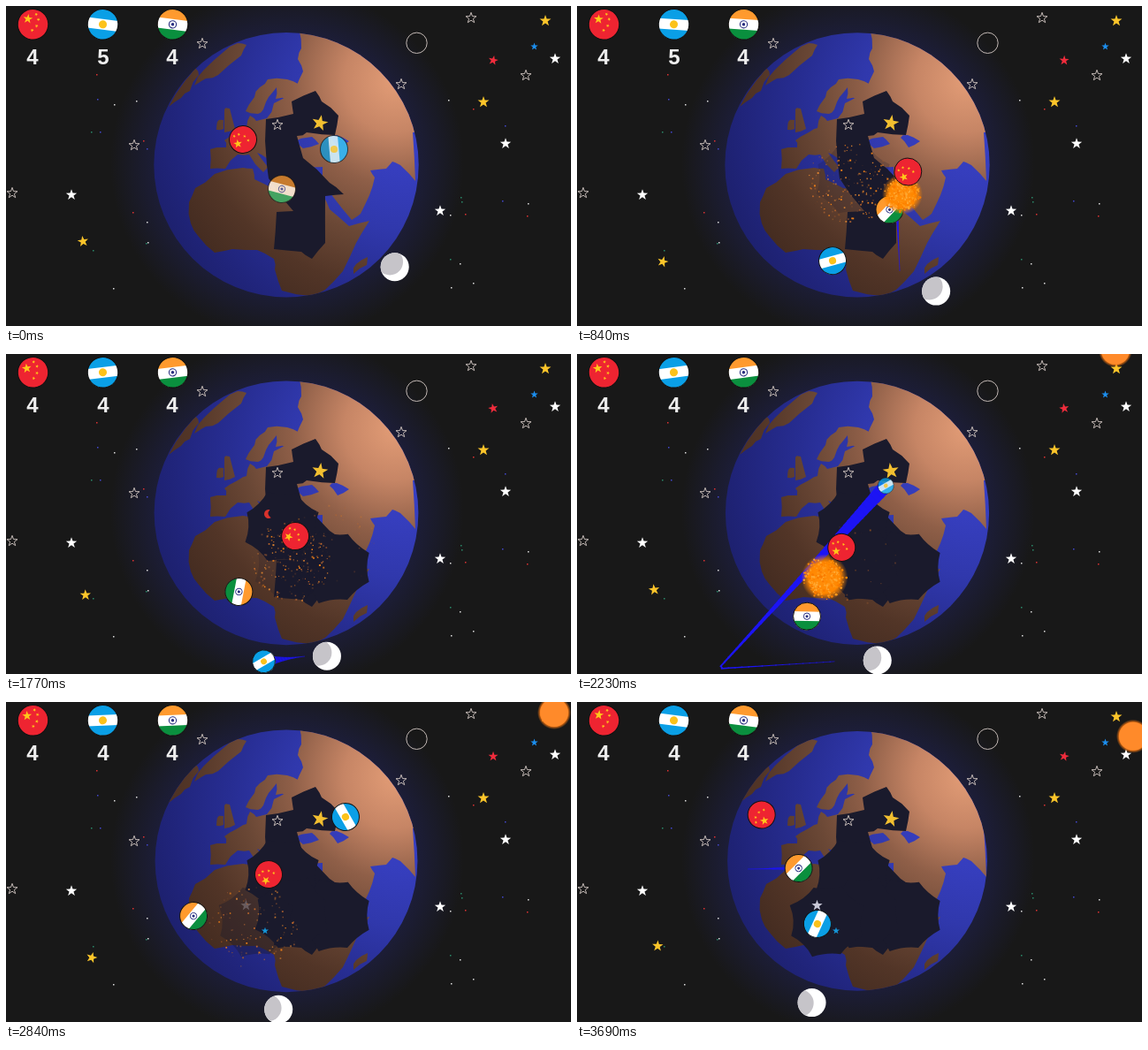
An HTML page with a canvas for the animation above (3760 ms loop, 639 px wide and 362 px high).

```html
<!DOCTYPE html>
<html lang="en">
<head>
<meta charset="utf-8">
<title>Planet battle</title>
<style>
  html, body { margin: 0; width: 100%; height: 100%; overflow: hidden; background: #181818; }
  canvas { position: absolute; left: 0; top: 0; }
  span {
    position: absolute; top: 46px; width: 40px; text-align: center;
    font: bold 24px/24px "Liberation Sans", Arial, sans-serif; color: #eee;
  }
</style>
</head>
<body>
<canvas id="stage" width="639" height="362"></canvas>
<span style="left:10px">4</span>
<span style="left:90px" id="score">5</span>
<span style="left:168px">4</span>
<script>
const ctx = document.getElementById('stage').getContext('2d');
const score = document.getElementById('score');
const LOOP = 3760, STEP = LOOP / 49, TAU = Math.PI * 2;
const clamp = v => Math.max(0, Math.min(1, v));
const wave = (t, period, peak = 0) => Math.cos((t - peak) / period * TAU);

function seeded(seed) {
  return () => (seed = (seed * 16807) % 2147483647) / 2147483647;
}

function pairs(text, draw) {
  const n = text.split(' ').map(Number);
  for (let i = 0; i < n.length; i += 2) draw(n[i], n[i + 1]);
}

// A closed outline; every side gets a small random kink
function coast(text) {
  const rnd = seeded(text.length), points = [], path = new Path2D();
  pairs(text, (x, y) => points.push([x, y]));
  points.forEach(([x, y], i) => {
    const [nx, ny] = points[(i + 1) % points.length];
    path.lineTo(x, y);
    path.lineTo((x + nx) / 2 + 3 * rnd() - 1.5, (y + ny) / 2 + 3 * rnd() - 1.5);
  });
  path.closePath();
  return path;
}

const greenland = '184 114 203 84 214 70 218 78 208 96 198 104';
const arctic = '213 90 224 72 246 52 262 42 272 44 266 56 240 78 226 82';
const britain = '247 117 253 116 259 139 247 143';
const ireland = '239 131 246 129 246 139 238 140';
const nordic = '271 119 281 103 287 92 296 83 318 83 334 90 318 105 305 105 306 92 297 103 291 117 285 122';
const eurasia = '231 162 249 160 247 152 262 143 272 138 276 124 283 130 295 127 303 110 318 102 328 92 '
  + '336 74 330 60 334 48 331 25 400 20 480 70 480 143 460 143 463 198 446 180 437 176 430 184 412 186 '
  + '417 194 411 214 401 235 391 242 370 216 358 196 358 182 334 183 318 172 306 175 308 187 296 173 '
  + '284 166 296 182 291 188 275 168 262 168 248 184 231 184';
const africa = '236 190 268 183 279 184 281 196 301 206 330 208 358 213 366 230 388 249 411 243 396 268 '
  + '381 300 361 321 345 328 312 322 304 298 303 286 284 276 256 275 236 279 218 261 209 246 207 222 214 206';
const madagascar = '393 303 396 292 409 284 408 293';
const land = [greenland, arctic, britain, ireland, nordic, eurasia, africa, madagascar].map(coast);
const lakes = ['325 154 346 148 354 156 336 161', '366 149 374 146 388 153 375 160'].map(coast);
const scar = coast('294 128 325 122 323 108 350 96 357 108 376 124 372 146 340 143 329 147 336 172 '
  + '366 200 382 213 361 215 361 268 346 286 334 278 303 275 306 233 325 232 297 195 295 180');

// Waypoints: time, x, y, angle
const ships = {
  india: [[0, 312, 207, 15], [500, 365, 300, -10], [780, 362, 232, -40], [840, 354, 230, -45], [1300, 299, 263, -180],
    [1770, 263, 269, -260], [2230, 260, 297, -360], [2840, 212, 242, -410], [3400, 193, 189, -408], [3690, 252, 188, -405]],
  argentina: [[0, 371, 162, -95], [840, 289, 288, -15], [1300, 293, 305, -60], [1610, 338, 342, -40],
    [1770, 290, 348, -30], [1900, 160, 356, -30], [2230, 352, 146, -30], [2840, 384, 130, -120], [3690, 271, 252, -65]],
  china: [[0, 268, 151, -80], [840, 374, 188, -92], [1060, 389, 165, -70], [1300, 337, 212, -25],
    [1770, 327, 206, -45], [2230, 299, 219, -75], [2840, 297, 195, -105], [3690, 208, 127, -155]],
};
const sunPath = [[1600, 594, -24], [2230, 609, -4], [2840, 620, 12], [3690, 629, 39]];

// Boosts: ship, from, to, width
const boosts = [['india', 500, 900, 4], ['china', 1060, 1380, 5], ['argentina', 1610, 2380, 15], ['india', 3400, LOOP, 5]];

// Blasts, each leaving a burnt hole nearby
const blasts = [
  { start: 230, x: 307, y: 200, size: 19, hole: [312, 196] },
  { start: 690, x: 368, y: 213, size: 20, hole: [371, 241] },
  { start: 1150, x: 324, y: 233, size: 17, hole: [324, 240] },
  { start: 2080, x: 280, y: 253, size: 23, hole: [283, 248] },
];
for (const b of blasts) {
  const rnd = seeded(b.start), [x, y] = b.hole, n = 8;
  b.path = new Path2D();
  for (let i = 0; i <= n; i++) {
    const a = i / n * TAU + .4, mid = a - TAU / n / 2, r = i % n ? 40 + 6 * rnd() : 43;
    b.path.quadraticCurveTo(x + 35 * Math.cos(mid), y + 35 * Math.sin(mid), x + r * Math.cos(a), y + r * Math.sin(a));
  }
}

function at(keys, t) {
  const i = Math.max(0, keys.findLastIndex(k => k[0] <= t));
  const a = keys[i], b = keys[i + 1] || a;
  const u = clamp((t - a[0]) / (b[0] - a[0] || 1));
  return a.slice(1).map((v, n) => v + (b[n + 1] - v) * u);
}

function disc(x, y, r, fill) {
  ctx.beginPath();
  ctx.arc(x, y, r, 0, TAU);
  ctx.fillStyle = fill;
  ctx.fill();
}

function ring(x, y, r, color, width = 1) {
  ctx.beginPath();
  ctx.arc(x, y, r, 0, TAU);
  ctx.strokeStyle = color;
  ctx.lineWidth = width;
  ctx.stroke();
}

function star(x, y, r, color, turn = 0, hollow = false) {
  ctx.beginPath();
  for (let i = 0; i < 10; i++) {
    const a = turn + i * TAU / 10 - TAU / 4, d = i % 2 ? r * .4 : r;
    ctx.lineTo(x + d * Math.cos(a), y + r * .1 + d * Math.sin(a));
  }
  ctx.closePath();
  ctx.fillStyle = ctx.strokeStyle = color;
  ctx.lineWidth = 1;
  hollow ? ctx.stroke() : ctx.fill();
}

function radial(x, y, r, ...colors) {
  const g = ctx.createRadialGradient(x, y, 0, x, y, r);
  colors.forEach((c, i) => g.addColorStop(i / (colors.length - 1), c));
  return g;
}

const glow = radial(318, 178, 200, '#20244c', '#20244c', '#1f2246', '#1c1d36', '#181818');
const water = radial(450, 120, 330, '#3840c8', '#363ebe', '#3038ac', '#272d92', '#20247a', '#1a1d62');
const soil = radial(440, 85, 290, '#e29c76', '#c68565', '#8f5f48', '#6b4836', '#523527', '#432b20');

function stripes(outer, inner, edge) {
  [[outer, -20], [inner, -5.5], [edge, 5.5]].forEach(([c, y]) => {
    ctx.fillStyle = c;
    ctx.fillRect(-20, y, 40, 40);
  });
}
const flags = {
  china() {
    ctx.fillStyle = '#ee2431';
    ctx.fillRect(-20, -20, 40, 40);
    star(-6, -5.5, 5.2, '#ffc61a');
    pairs('2 -11 5 -6 4 1 0 6', (x, y) => star(x, y, 1.9, '#ffc61a', .4));
  },
  argentina() {
    stripes('#0a9fe6', '#fff', '#0a9fe6');
    disc(0, 0, 4.2, '#fcc21b');
  },
  india() {
    stripes('#ff9a2e', '#fff', '#0a8f3e');
    ring(0, 0, 3.8, '#2a3080');
    disc(0, 0, 1.6, '#2a3080');
  },
};

function badge(name, x, y, angle, r, alpha = 1) {
  ctx.save();
  ctx.globalAlpha = alpha;
  ctx.translate(x, y);
  ctx.rotate(angle * TAU / 360);
  ctx.scale(r / 16, r / 16);
  ctx.save();
  ctx.beginPath();
  ctx.arc(0, 0, 16, 0, TAU);
  ctx.clip();
  flags[name]();
  ctx.restore();
  ring(0, 0, 16, '#111');
  ctx.restore();
}

// Faint distant stars in the bands beside the globe
function drawDust() {
  const rnd = seeded(77), colors = ['#ddd', '#d33', '#2a8a6a', '#4348d0', '#ddd'];
  for (let i = 0; i < 28; i++) {
    ctx.fillStyle = colors[i % 5];
    const x = i % 2 ? 160 - 140 * rnd() ** 2 : 500 + 90 * rnd();
    ctx.fillRect(Math.round(x), Math.round(75 + 245 * rnd()), 1.5, 1.5);
  }
}

function drawSky(t) {
  ctx.fillStyle = '#181818';
  ctx.fillRect(0, 0, 639, 362);
  disc(318, 178, 200, glow);
  drawDust();
  pairs('621 59 565 155 74 213 491 231', (x, y) => star(x, y, 6.5, '#fff'));
  pairs('610 16 540 108', (x, y) => star(x, y, 6.8, '#fcc52a'));
  const s = wave(t, 2000, 1100);
  star(92.8 + 6 * s, 279 + 14 * s, 6.5, '#fcc52a', .25 * s + .1);
  star(551, 61, 5.8, '#f02c3c', .2 * wave(t, LOOP));
  star(597.5, 45.5, 4.4, '#1c8ff0');
}

function drawGlobe(t) {
  ctx.save();
  ctx.beginPath();
  ctx.arc(317, 179.8, 149.7 - 3 * (t / LOOP) ** 3, 0, TAU);
  ctx.clip();
  const paint = (color, paths) => {
    ctx.fillStyle = color;
    paths.forEach(p => ctx.fill(p));
  };
  ctx.fillStyle = water;
  ctx.fillRect(160, 20, 320, 320);
  paint(soil, land);
  paint(water, lakes);
  paint('#1a1a2c', [scar]);
  for (const b of blasts) {
    ctx.globalAlpha = clamp((t - b.start - 100) / 900) ** 3;
    paint('#1a1a2c', [b.path]);
  }
  ctx.restore();
}

function drawMarks(t) {
  const line = '#c2b8b4';
  pairs('222 42 526 13 588 78 447 88 145 157 7 211 307 134', (x, y) => star(x, y, 6.3, line, 0, true));
  ring(464.5, 41.8, 11.7, line);
  star(355, 131.5, 9.5, '#f2bf30', .2 * wave(t, 940));
  ctx.globalAlpha = .85 * clamp((t - 2600) / 800);
  star(271.5, 229.5, 6.5, '#e6e6f4');
  ctx.globalAlpha = clamp((t - 2600) / 100);
  star(293, 258.5, 4.2, '#1596d8');
  ctx.globalAlpha = 1;
  if (t > 1100 && t < 2200) {
    ctx.beginPath();
    ctx.arc(297, 181, 5, 1, 5);
    ctx.quadraticCurveTo(294, 181, 299.7, 185.2);
    ctx.fillStyle = '#d8322c';
    ctx.fill();
  }
}

// Recent path of a ship, widening towards it
function drawBoost([name, from, to, width], t) {
  if (t <= from || t > to) return;
  const tail = Math.max(from, t - 460), n = 60;
  ctx.strokeStyle = '#1c14f4';
  for (let i = 0; i < n; i++) {
    ctx.beginPath();
    for (const k of [i, i + 1.2]) ctx.lineTo(...at(ships[name], Math.min(t, tail + (t - tail) * k / n)).slice(0, 2));
    ctx.lineWidth = .6 + width * (i / n) ** 2;
    ctx.stroke();
  }
}

function drawDebris({ start, x, y }, t) {
  const age = t - start;
  if (age < 220 || age > 1300) return;
  const rnd = seeded(start * 7 + 11), spread = 44 * Math.min(1.15, Math.sqrt(age / 550));
  for (let i = 0; i < 220; i++) {
    const a = rnd() * TAU, d = spread * Math.sqrt(rnd()), size = 1 + rnd(), life = 600 + 700 * rnd() ** 2;
    ctx.fillStyle = ['#f08018', '#c0682c', '#d88030', '#9a5830'][i % 4];
    ctx.globalAlpha = clamp(2.5 * (1 - age / life));
    ctx.fillRect(x + d * Math.cos(a), y + d * Math.sin(a), size, size);
  }
  ctx.globalAlpha = 1;
}

function drawFire({ start, x, y, size }, t) {
  const age = t - start;
  if (age < 0 || age > 380) return;
  const rnd = seeded(start + 5), r = size * Math.min(1, .35 + age / 200);
  ctx.globalAlpha = clamp((380 - age) / 160);
  disc(x, y, r * 1.15, radial(x, y, r * 1.15, '#ff8c08', '#ff8c08', '#ff8600', '#ff860000'));
  for (let i = 0; i < 260; i++) {
    const a = rnd() * TAU, d = r * Math.sqrt(rnd()) * (.8 + .3 * rnd());
    disc(x + d * Math.cos(a), y + d * Math.sin(a), .5 + .9 * rnd(), ['#ff8800', '#ff9a1c', '#f87a00', '#ffa832'][i % 4]);
  }
  ctx.globalAlpha = 1;
}

function drawMoon(t) {
  const u = t / LOOP, a = (43.3 + 65.8 * u) * TAU / 360, shade = (225 - 48 * u) * TAU / 360, off = 8 + 5 * u;
  const x = 317 + 168.6 * Math.cos(a), y = 179.5 + 168.6 * Math.sin(a);
  disc(x, y, 16, '#fff');
  ctx.save();
  ctx.clip();
  disc(x + off * Math.cos(shade), y + off * Math.sin(shade), 15, '#c6c4c9');
  ctx.restore();
}

function drawSun(t) {
  const [x, y] = at(sunPath, t);
  disc(x, y, 19, radial(x, y, 19, '#ff7a10', '#ff7a10', '#ff7a10', '#ff7a10', '#ff7a10', '#ff7a1000'));
  disc(x, y, 16, '#ff8a2a');
}

function drawShip(name, t) {
  const [x, y, angle] = at(ships[name], t);
  const scale = name === 'argentina' ? Math.min(1, .53 + Math.abs(t - 2160) / 1300) : 1;
  const alpha = name === 'china' ? 1 : clamp(.75 + t / 1000);
  badge(name, x, y, angle, 15.5 * scale, Math.min(alpha, .2 + scale));
  if (name === 'argentina' && t > 1150 && t < 1500) ring(x, y, 16.5, '#a9a9ae', 2);
}

function draw(t) {
  drawSky(t);
  drawGlobe(t);
  drawMarks(t);
  blasts.forEach(b => drawDebris(b, t));
  boosts.forEach(b => drawBoost(b, t));
  drawMoon(t);
  drawSun(t);
  drawShip('india', t);
  drawShip('argentina', t);
  blasts.forEach(b => drawFire(b, t));
  drawShip('china', t);
  Object.keys(flags).forEach((name, i) => badge(name, 30.5 + 79 * i, 20.8, 8 * wave(t, LOOP, 200), 17.3));
  score.textContent = t < 1640 ? 5 : 4;
}

function tick() {
  const t = performance.now() % LOOP;
  draw(Math.min(48, Math.floor((t + 7) / STEP)) * STEP);
  requestAnimationFrame(tick);
}
tick();
</script>
</body>
</html>
```
